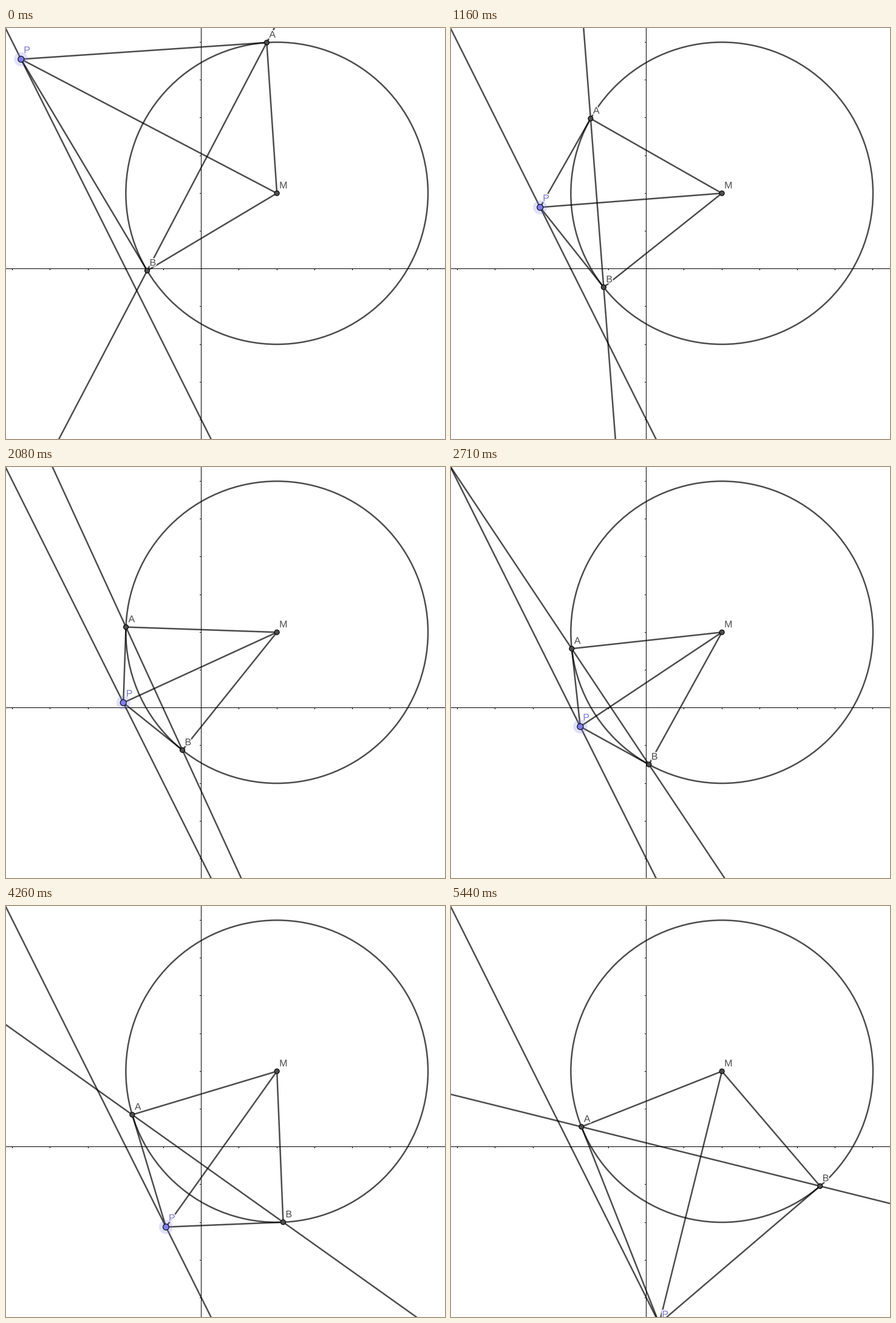
These frames come from a looping animation (723 by 677 pixels, 5670 ms). A matplotlib script:

```python
import numpy as np
import matplotlib.pyplot as plt
from matplotlib import patheffects
from matplotlib.animation import FuncAnimation
from matplotlib.patches import Circle

W, H, DPI = 723, 677, 72          # at 72 dpi one point is one pixel
LOOP, INTERVAL = 5670, 30
ORIGIN, UNIT = np.array([321.78, 396.62]), 62.2
M, R = np.array([2.0, 2.0]), 4.0
GREY, BLUE = "#4d4d4d", "#7d7df4"

# Times at which the picture moves on, in ms
STEPS = np.concatenate([
    [0], np.linspace(70, 1080, 9),
    [1160], np.linspace(1310, 2080, 8),
    np.linspace(2230, 2710, 5), np.linspace(2860, 3180, 3),
    [3330, 3480, 3710, 3835, 3960],
    np.linspace(4260, 4730, 5), [4960, 5190, 5360, 5440],
])

# Height of P on the stage over time
KEY_T = np.array([0, 1160, 2080, 2710, 3180, 3480, 3960, 4730, 5190, 5440.0])
KEY_Y = np.array([51.4, 295.4, 388.3, 427.6, 450, 469.4, 505, 570.9, 621.6, 687.7])
SLOPE = np.gradient(KEY_Y, KEY_T)


def height(t):
    """Cubic Hermite curve through the key heights."""
    i = min(max(np.searchsorted(KEY_T, t, side="right") - 1, 0), len(KEY_T) - 2)
    span = KEY_T[i + 1] - KEY_T[i]
    s = (t - KEY_T[i]) / span
    blend = s * s * (3 - 2 * s)
    return (KEY_Y[i] * (1 - blend) + KEY_Y[i + 1] * blend
            + span * s * (1 - s) * (SLOPE[i] * (1 - s) - SLOPE[i + 1] * s))


def px(point):
    return ORIGIN + UNIT * np.asarray(point) * [1, -1]


def tangent_points(p):
    """Where the tangents from p touch the circle."""
    d = p - M
    q = d @ d
    foot = M + d * R**2 / q
    side = np.array([d[1], -d[0]]) * R * np.sqrt(q - R**2) / q
    return foot + side, foot - side


fig = plt.figure(figsize=(W / DPI, H / DPI), dpi=DPI, facecolor="white")
ax = fig.add_axes([0, 0, 1, 1])
ax.set_xlim(0, W)
ax.set_ylim(H, 0)
ax.axis("off")


def hairline(xs, ys):
    ax.plot(xs, ys, color="black", lw=1, snap=False,
            solid_capstyle="butt", zorder=1)


def stroke(a=(0, 0), b=(0, 0)):
    line, = ax.plot([a[0], b[0]], [a[1], b[1]], color="black", alpha=0.7,
                    lw=2.5, solid_capstyle="butt", zorder=2)
    return line


def set_ends(line, a, b):
    line.set_data([a[0], b[0]], [a[1], b[1]])


def extend(a, b):
    """Two far ends of the line through a and b."""
    d = (b - a) / np.hypot(*(b - a)) * 2000
    return a - d, a + d


class Point:
    def __init__(self, name, radius, fill, ink, offset):
        self.offset = np.array(offset)
        self.dots = [Circle((0, 0), radius, fc=fill, ec="black", lw=1.1, zorder=5)]
        if fill == BLUE:
            self.dots.append(Circle((0, 0), 11.5, fc=BLUE, ec="none",
                                    alpha=0.23, zorder=4))
        for dot in self.dots:
            ax.add_patch(dot)
        halo = patheffects.withStroke(linewidth=3.5, foreground="white")
        self.label = ax.text(0, 0, name, family="Liberation Sans", size=16,
                             color=ink, va="baseline", ha="left", zorder=3,
                             path_effects=[halo])

    def move(self, pos):
        for dot in self.dots:
            dot.set_center(pos)
        self.label.set_position(pos + self.offset)


# Axes with ticks, each on whole pixels
axis_x, axis_y = np.floor(ORIGIN) + 0.5
hairline([0, W], [axis_y, axis_y])
hairline([axis_x, axis_x], [0, H])
for k in range(-6, 8):
    x, y = np.floor(ORIGIN + UNIT * k) + 0.5
    hairline([x, x], [axis_y, axis_y + 2.5])
    hairline([axis_x - 2.5, axis_x], [y, y])

ax.add_patch(Circle(px(M), R * UNIT, fill=False, ec="black", alpha=0.7,
                    lw=2.5, zorder=2))
stroke(*extend(px((-2, 0)), px((0, -4))))

chord, pa, pb, pm, ma, mb = [stroke() for _ in range(6)]
dot_a, dot_b, dot_m = [Point(n, 4, GREY, GREY, (4, -8)) for n in "ABM"]
dot_p = Point("P", 5, BLUE, "#7a7acc", (4.5, -10))
dot_m.move(px(M))


def draw(frame):
    now = frame * INTERVAL + 20
    t = STEPS[np.searchsorted(STEPS, now, side="right") - 1]
    y = (ORIGIN[1] - height(t)) / UNIT
    p = np.array([-(y + 4) / 2, y])
    a, b = (px(v) for v in tangent_points(p))
    p, m = px(p), px(M)

    set_ends(chord, *extend(a, b))
    for line, ends in ((pa, (p, a)), (pb, (p, b)), (pm, (p, m)),
                       (ma, (m, a)), (mb, (m, b))):
        set_ends(line, *ends)
    for dot, pos in ((dot_a, a), (dot_b, b), (dot_p, p)):
        dot.move(pos)
    return []


anim = FuncAnimation(fig, draw, frames=LOOP // INTERVAL, interval=INTERVAL,
                     repeat=True, repeat_delay=0, blit=False)
plt.show()
```
